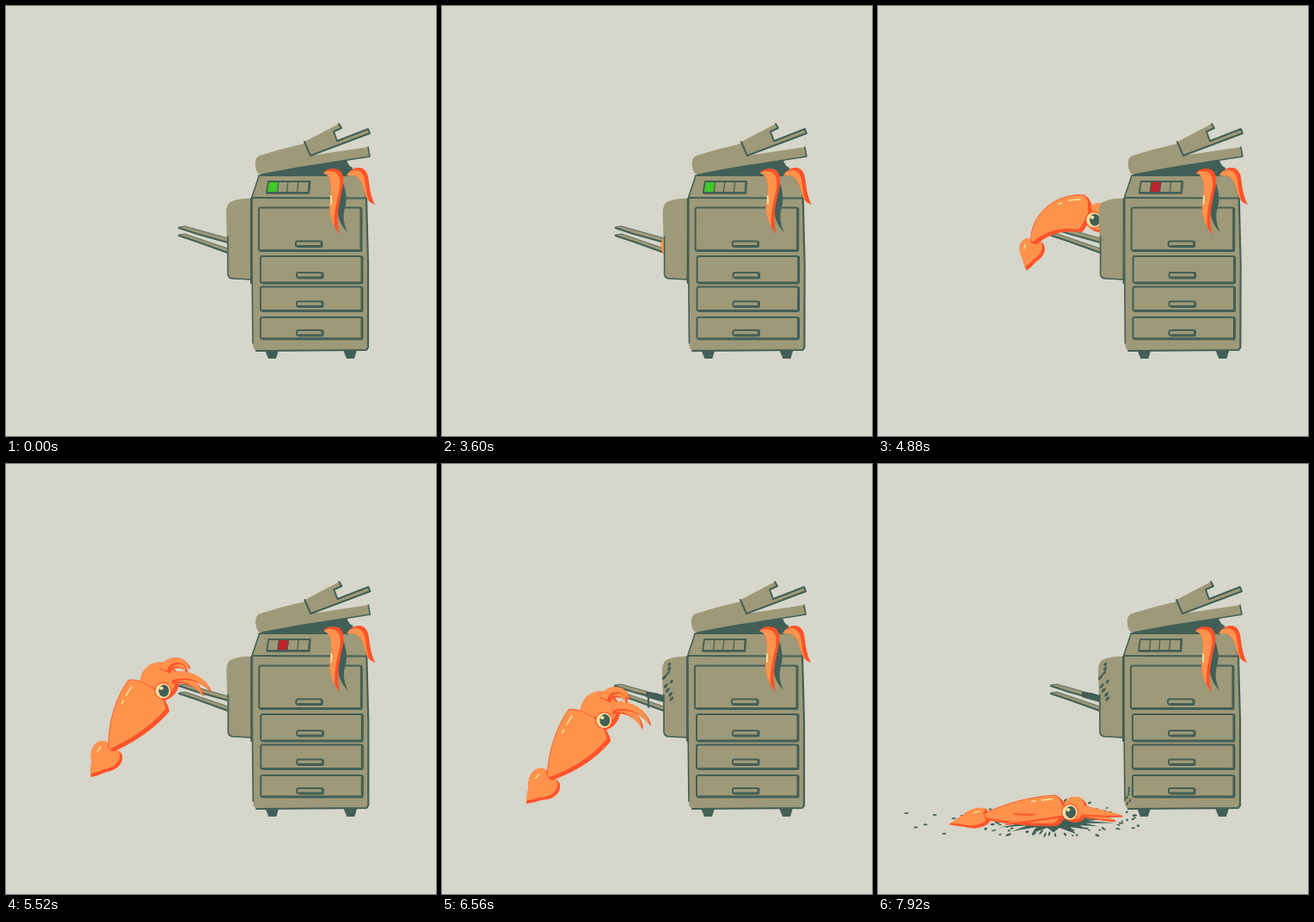
An HTML page with a canvas that plays this animation: 500 by 500 pixels, repeating every 8000 ms.

```html
<!DOCTYPE html>
<html>
<head>
<meta charset="utf-8">
<style>
html, body { margin: 0; width: 100%; height: 100%; overflow: hidden; background: #d6d6ca; }
canvas { display: block; width: 100vw; height: 100vh; }
</style>
</head>
<body>
<canvas id="c" width="500" height="500"></canvas>
<script>
const ctx = document.getElementById('c').getContext('2d');
const BG = '#d6d6ca', TAN = '#9e9978', DARK = '#425f57';
const ORANGE = '#ff934c', RED = '#ff5329', CREAM = '#f5dfa0';
const LOOP = 8000, STEP = 80, RAD = Math.PI / 180;

const clamp = (v, a = 0, b = 1) => Math.min(b, Math.max(a, v));
const mix = (a, b, k) => a + (b - a) * k;
const ease = k => k * k * (3 - 2 * k);
const span = (t, a, b) => clamp((t - a) / (b - a));
const rnd = n => { const v = Math.sin(n * 127.1 + 11.7) * 43758.5453; return v - Math.floor(v); };

// ---- drawing helpers ----
function fill(d, color) { ctx.fillStyle = color; ctx.fill(new Path2D(d)); }
function line(d, w = 2, color = DARK) {
  ctx.strokeStyle = color; ctx.lineWidth = w; ctx.stroke(new Path2D(d));
}
function oval(x, y, rx, ry, color, a = 0) {
  ctx.beginPath(); ctx.ellipse(x, y, rx, ry, a, 0, 7); ctx.fillStyle = color; ctx.fill();
}
// red shape with an orange copy shifted inside it
function shaded(path, dx = -4, dy = -3) {
  ctx.save();
  ctx.fillStyle = RED; ctx.fill(path); ctx.clip(path);
  ctx.translate(dx, dy);
  ctx.fillStyle = ORANGE; ctx.fill(path);
  ctx.restore();
}
// band that starts at x, y and turns evenly by bend degrees
function ribbon(x, y, angle, bend, len, width) {
  const n = 24, left = [], right = [], glint = [];
  for (let i = 0; i <= n; i++) {
    const s = i / n, a = (angle + bend * s) * RAD, h = width(s) / 2;
    const nx = -Math.sin(a), ny = Math.cos(a);
    left.push([x + nx * h, y + ny * h]);
    right.unshift([x - nx * h, y - ny * h]);
    glint.push([x + nx * h * 0.75, y + ny * h * 0.75]);
    if (i < n) { x += Math.cos(a) * len / n; y += Math.sin(a) * len / n; }
  }
  return { path: new Path2D('M' + left.concat(right).join('L') + 'Z'), x, y, glint };
}

// ---- printer ----
function frame(x, y, w, h) {
  ctx.strokeStyle = DARK; ctx.lineWidth = 2;
  ctx.beginPath(); ctx.roundRect(x, y, w, h, 2); ctx.stroke();
  line(`M${x + w} ${y + 1}v${h - 2}q0 1-1 1h${4 - w}`, 3);
}
function trayArms() {
  for (const i of [0, 1]) {
    const y = 257 + i * 9, end = 271 + i * 12;
    fill(`M200 ${y}L208 ${y - 1}L258 ${end - 1}V${end + 5}Z`, TAN);
    line(`M201 ${y + 1}L222 ${y + 8}L258 ${end + 4}`, 2);
    line(`M201 ${y}L208 ${y - 1}L258 ${end - 1}`, 0.8);
  }
}
function sideBox() {
  fill('M256 240Q256 229 263 227Q274 223 287 224V319L264 317Q258 317 258 307Z', TAN);
  line('M258 268V312Q259 317 264 317L286 318', 1.6);
}
function cabinet(lamp) {
  for (const x of [301, 392]) fill(`M${x} 400h16l-3 10h-9Z`, DARK);
  fill('M295 197L416 196L419 223L421 397Q421 400 417 400L293 401Q287 401 287 393L285 224Z', TAN);
  line('M294 198L286 222V300L287 392', 1.6);
  line('M285 224V322', 2);
  line('M291 401L419 400L421 397V300L419 224L417 198', 2.2);
  line('M286 223L419 223.5', 1.8);

  frame(294, 234.5, 119, 50);
  frame(337, 273.5, 30, 6);
  for (let i = 0; i < 3; i++) {
    const y = 291 + i * 35.5;
    frame(296, y, 118, [31, 28, 25][i]);
    frame(338, y + 19 - i * 2, 30, 6);
  }

  if (lamp) {
    const x = lamp === 'green' ? 305 : 317;
    fill(`M${x} 204h12l-2 13h-12Z`, lamp === 'green' ? '#40c827' : '#c3202c');
  }
  line('M305 204H353L352 217H303Z', 1.8);
  line('M353 204L352 217.5H304', 2.6);
  for (const x of [317, 328, 340]) line(`M${x} 204l-1.5 13`, 1.3);
}
const GAP = 'M292 197L320 190L396 179Q398 186 403 188Q405 197 396 198H294Z';
function tentacles() {
  fill('M389 198Q399 220 394 235Q390 248 397 263Q384 250 386 232Q392 214 388 198Z', DARK);
  shaded(new Path2D('M369 194Q375 187 386 190Q394 194 392 209Q386 234 386 243Q385 253 388 266Q376 250 376 234Q380 211 376 200Q374 196 369 194Z'), -4, 3);
  line('M378 221L378 230', 2, CREAM);
  shaded(new Path2D('M396 197Q402 187 412 188Q421 190 422 205Q424 222 429 231Q419 228 417 216Q413 199 404 197Z'), -4, 3);
}
function peek(x) {
  ctx.save();
  ctx.clip(new Path2D(GAP));
  ctx.translate(x, 189 - (x - 374) * 0.09);
  fill('M-14-1L-8-6L15-8L13 2L4 8L-8 6Z', ORANGE);
  line('M-13 0L-5 4L3 1L12 3', 1.6, RED);
  line('M-9-4L-4 0L3-4L11-5M-3 4L2-1L8 1', 1.2, CREAM);
  ctx.restore();
}
function lid(peekX) {
  fill(GAP, DARK);
  tentacles();
  if (peekX !== null) peek(peekX);
  fill('M295 174Q320 166 347 160L354 174L421 164L423 175L360 184L296 196Q291 195 290 186Q289 176 295 174Z', TAN);
  line('M297 196L340 188L423 175L421 164', 1.6);
  fill('M347 158L387 137L390 142L381 146L385 157L421 143L423 149L355 174Z', TAN);
  line('M347 158L354 174L423 148L421 143L385 157L381 146L390 142L387 137', 2);
}

// ---- squid ----
// aim: mantle angle; outer and inner: angle, curl and length of an arm pair
const OUT = { x: 258, y: 246, r: 17, aim: 195, bend: -85, len: 86, wide: 43, fin: [105, 33, 13],
  outer: [360, 0, 40], inner: [360, 0, 30] };
const HANG = { x: 181, y: 271, r: 23, aim: 88, bend: 0, len: 92, wide: 61, fin: [93, 40, 17],
  outer: [305, 85, 55], inner: [250, 150, 40] };
const SPLAT = { x: 222, y: 403, r: 14, aim: 172, bend: 78, len: 86, wide: 31, fin: [320, 32, 12],
  outer: [360, -140, 60], inner: [205, 80, 50] };
const FLAT = { x: 229, y: 402, r: 15, aim: 178, bend: -5, len: 99, wide: 35, fin: [167, 43, 10],
  outer: [368, 0, 48], inner: [168, 0, 75] };

// rotates a pose about the grip on the tray
function swing(s, deg, dx = 0, dy = 0) {
  const c = Math.cos(deg * RAD), n = Math.sin(deg * RAD), x = s.x - 205, y = s.y - 250;
  const spin = ([a, ...rest]) => [a + deg, ...rest];
  return { ...s, x: 205 + dx + x * c - y * n, y: 250 + dy + x * n + y * c,
    aim: s.aim + deg, fin: spin(s.fin), outer: spin(s.outer), inner: spin(s.inner) };
}
const MOVES = [
  [3520, swing(OUT, 0, 92, -4)], [4400, swing(OUT, 0, 9)], [4880, OUT], [5120, swing(OUT, 0, -10, 3)],
  [5600, swing(HANG, 35)], [5920, swing(HANG, -7)], [6160, HANG], [6320, swing(HANG, 8, 0, 6)],
  [6640, swing(HANG, 45, 12, 42)], [6880, SPLAT], [6960, SPLAT], [7280, FLAT], [LOOP, FLAT]
];
function pose(t) {
  const i = MOVES.findIndex(m => m[0] > t), [t0, a] = MOVES[i - 1], [t1, b] = MOVES[i];
  const k = ease(span(t, t0, t1)), out = {};
  for (const key in a) {
    out[key] = Array.isArray(a[key]) ? a[key].map((v, j) => mix(v, b[key][j], k)) : mix(a[key], b[key], k);
  }
  return out;
}
function fin(x, y, [angle, len, half]) {
  ctx.save();
  ctx.translate(x, y);
  ctx.rotate(angle * RAD);
  const side = s => `C${-len * 0.35} ${s * half * 0.8} ${len * 0.2} ${s * half * 1.7} ${len * 0.6} ${s * half * 0.65}Q${len * 0.8} ${s * half * 0.4} ${len} 0`;
  const a = -angle * RAD, dx = -3 * Math.cos(a) + 3 * Math.sin(a), dy = -3 * Math.sin(a) - 3 * Math.cos(a);
  shaded(new Path2D('M0 0' + side(1) + 'M0 0' + side(-1)), dx, dy);
  line(`M${len * 0.12} ${half * 0.7}h${len * 0.15}`, 1.4, CREAM);
  ctx.restore();
}
function arms(s, [angle, curl, len]) {
  for (const i of [1, 0]) {
    const a = angle + i * 8, c = Math.cos(a * RAD), n = Math.sin(a * RAD);
    const w = q => 12 * Math.pow(1 - q, 0.6);
    shaded(ribbon(s.x + c * s.r * 0.6, s.y + n * s.r * 0.6, a, curl, len * (1 - i * 0.15), w).path, -2, -2);
  }
}
function squid(t) {
  const s = pose(t), c = Math.cos(s.aim * RAD), n = Math.sin(s.aim * RAD);
  const mantle = ribbon(s.x + c * 10, s.y + n * 10, s.aim, s.bend, s.len - 4,
    q => Math.min(1, Math.sqrt(q * 9)) * (s.wide * (1 - q * q) + 7 * q));
  fin(mantle.x, mantle.y, s.fin);
  const head = new Path2D();
  head.arc(s.x, s.y, s.r, 0, 7);
  shaded(head);
  shaded(mantle.path);
  ctx.strokeStyle = RED; ctx.lineWidth = 0.8; ctx.stroke(mantle.path);
  const g = mantle.glint;
  line(`M${g.slice(4, 8).join('L')}M${g.slice(9, 11).join('L')}`, 1.6, CREAM);
  arms(s, s.inner);
  arms(s, s.outer);

  const side = (s.r - 12) * 0.9, ex = s.x + c * 6 + n * side, ey = s.y + n * 6 - c * side;
  oval(ex, ey, 10, 10, RED);
  oval(ex, ey, 8.8, 8.8, CREAM);
  oval(ex + 1, ey, 6, 7, DARK);
  oval(ex - 2, ey - 3, 2.4, 2, CREAM);
}

// ---- ink ----
function splat(x, y, rx, ry, spikes) {
  const p = [];
  for (let i = 0; i < spikes * 2; i++) {
    const a = i * Math.PI / spikes, d = i % 2 ? 0.8 + rnd(i) * 0.3 : 0.55;
    p.push([x + Math.cos(a) * rx * d, y + Math.sin(a) * ry * d]);
  }
  fill('M' + p.join('L') + 'Z', DARK);
}
function trayInk(t) {
  if (t < 6080) return;
  const k = span(t, 6000, 6160), fade = 1 - span(t, 6160, 6400);
  fill('M237 265L248 266L258 269V277L247 274L237 271Z', DARK);
  for (let i = 0; i < 9; i++) {
    oval(258 + rnd(i) * 9, 233 + i * 5, 1 + rnd(i + 7) * 0.6, 2 + rnd(i + 5) * 1.6, DARK, 0.7);
  }
  splat(251, 267, 17 * k * fade, 25 * k * fade, 9);
  if (t < 6480) {
    const out = 1 + span(t, 6160, 6480) * 1.2;
    for (let i = 0; i < 9; i++) {
      const a = 3.3 + i * 0.2, d = (27 + rnd(i + 40) * 10) * out;
      line(`M${252 + Math.cos(a) * d} ${268 + Math.sin(a) * d}l4 ${i * 0.7 - 3}`, 2);
    }
  }
  if (t >= 6320 && t < 7280) line(`M240 270v${6 + span(t, 6320, 6820) * 14}`, 2.2);
}
function groundInk(t) {
  if (t < 6800) return;
  const k = ease(span(t, 6960, 7280));
  splat(mix(224, 204, k), 415, mix(48, 72, k), 15, 18);
  const n = mix(26, 75, k), w = mix(65, 82, k);
  for (let i = 0; i < n; i++) {
    const a = i * 2.4, d = 0.75 + rnd(i) * 0.55;
    const dx = Math.cos(a) * w * d, dy = Math.sin(a) * 17 * d;
    oval(203 + dx, 413 + dy, 1 + rnd(i + 9) * 2.4, 0.7 + rnd(i + 2) * 0.8, DARK, Math.atan2(dy, dx));
  }
  // far flecks to the left and spots on the cabinet foot
  for (let i = 0; i < 6 * k; i++) {
    oval(33 + i * 11, 406 + (i ? rnd(i) * 24 : 0), 2.5, 1, DARK);
    oval(289 + rnd(i) * 4, 377 + i * 3.6, 1.1, 2, DARK, 0.4);
  }
}
function drops(t) {
  if (t < 6880 || t > 7120) return;
  const fall = Math.max(0, t - 6960) * 0.1;
  for (let i = 0; i < 5; i++) {
    const x = 158 + i * 17, y = [362, 356, 340, 357, 352][i] + fall;
    line(`M${x} ${y}l${i < 3 ? -4 : 4} 6`, 2.2);
  }
}

// ---- scene ----
function peekAt(t) {
  if (t < 640 || t >= 2800) return null;
  if (t < 1520) return mix(302, 405, span(t, 640, 1440));
  return 405 - 115 * Math.pow(span(t, 1520, 2800), 1.5);
}
function lampAt(t) {
  if (t < 3840) return 'green';
  return t % 640 >= 320 ? 'red' : '';
}
function draw(t) {
  ctx.fillStyle = BG;
  ctx.fillRect(0, 0, 500, 500);
  ctx.lineJoin = ctx.lineCap = 'round';

  const n = t / STEP, shake = t >= 3600 && t < 6000 ? 1 : 0;
  const lean = shake * (rnd(n) - 0.5) * 0.005, dx = shake * (rnd(n + 5) - 0.3);
  const machine = parts => {
    ctx.save();
    ctx.transform(1, 0, lean, 1, dx - lean * 400, 0);
    parts();
    ctx.restore();
  };
  const body = () => { sideBox(); cabinet(lampAt(t)); lid(peekAt(t)); };

  machine(trayArms);
  if (t >= 3600 && t < 6640) squid(t);
  machine(body);
  trayInk(t);
  groundInk(t);
  if (t >= 6640) squid(t);
  drops(t);
}
const start = performance.now();
function tick(now) {
  const t = Math.max(0, now - start) % LOOP;
  draw(Math.floor(t / STEP) * STEP);
  requestAnimationFrame(tick);
}
draw(0);
requestAnimationFrame(tick);
</script>
</body>
</html>
```
